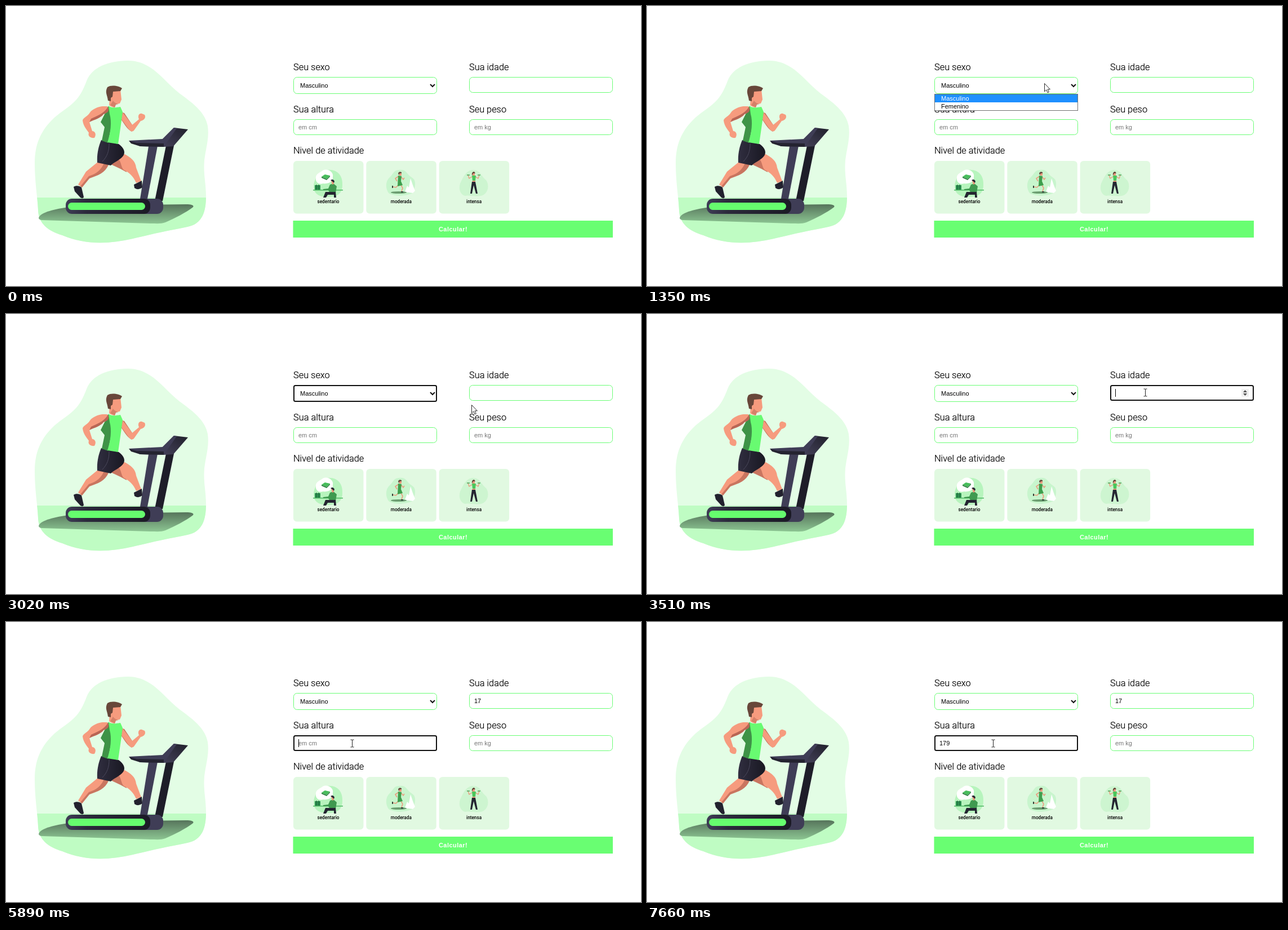
Animation, 1127 px wide and 497 px high, one loop 7.99 s. Source, as an HTML page:

```html
<!DOCTYPE html>
<html lang="pt-BR">
<head>
<meta charset="utf-8">
<title>Calculadora</title>
<style>
html, body { margin: 0; width: 100%; height: 100%; overflow: hidden; background: #fff; }
svg { display: block; width: 1127px; height: 497px; }
.label { font: 300 16.35px Roboto, sans-serif; stroke: #000; stroke-width: .2; }
.field { font: 11px "Liberation Sans", Arial, sans-serif; }
.hint { fill: #757575; }
.level { font: 500 8.2px Roboto, sans-serif; text-anchor: middle; }
.send { font: bold 11px "Liberation Sans", Arial, sans-serif; letter-spacing: .45px; text-anchor: middle; fill: #fff; }
.box { fill: #fff; stroke: #69fd74; }
#ring { fill: #fff; stroke: #101010; stroke-width: 2; }
</style>
</head>
<body>
<svg viewBox="0 0 1127 497">
  <defs>
    <clipPath id="blob"><path d="M215 97C181 98 153 108 143 133C132 162 124 170 100 187C67 210 51 240 51 277C51 315 56 338 57 363C58 386 74 399 100 407C140 424 182 423 225 413C270 402 298 397 322 392C349 387 355 364 355 338C355 313 350 300 352 274C355 250 361 235 358 213C354 191 336 176 316 161C281 138 262 96 215 97Z"/></clipPath>
    <linearGradient id="shade" x1="0" y1="0" x2="0" y2="1"><stop stop-color="#56745b"/><stop offset="1" stop-color="#8cc592"/></linearGradient>
    <linearGradient id="deck"><stop stop-color="#3f3d56"/><stop offset=".25" stop-color="#2b293b"/><stop offset="1" stop-color="#1b1a25"/></linearGradient>
    <linearGradient id="panel" x1="0" y1="1" x2="1" y2="0"><stop stop-color="#444159"/><stop offset="1" stop-color="#20202b"/></linearGradient>
    <linearGradient id="cloth"><stop stop-color="#302e40"/><stop offset="1" stop-color="#191822"/></linearGradient>
  </defs>

  <g clip-path="url(#blob)">
    <path fill="#e3fde5" d="M40 90H370V430H40Z"/>
    <path fill="#bffcc3" d="M40 340H370V430H40Z"/>
  </g>
  <path fill="url(#shade)" d="M58 376C61 366 88 360 112 357L220 353L320 352C330 352 334 354 332 357C319 367 299 377 283 384C276 387 267 386 258 386L63 380Q58 379 58 376Z"/>

  <!-- treadmill -->
  <path fill="#1e1d29" d="M284 248H298L278 346H264Z"/>
  <rect x="200" y="342" width="79" height="27" rx="11" fill="#3f3d56"/>
  <rect x="106" y="342" width="150" height="27" rx="11" fill="url(#deck)"/>
  <rect x="110" y="349" width="137" height="13" rx="6.5" fill="#66fd6e"/>
  <path fill="#3f3d56" d="M254 243H270L251 342H238Z"/>
  <path fill="url(#panel)" d="M298 216L323 219L297 249L280 250L276 238Z"/>
  <path fill="#3f3d56" d="M218 239L278 236L298 216L303 217L280 250L238 249Z"/>
  <path fill="#242330" d="M218 239L232 243L280 244V250L238 249L222 244Z"/>

  <!-- runner -->
  <path fill="#c97560" d="M204 188L210 190L224 211L229 213L223 223C214 218 208 206 204 201Z"/>
  <path fill="#f69b7e" d="M207 189L224 211L236 201C233 194 237 190 241 191L246 193C249 198 245 203 239 204L227 221Q223 225 218 219L205 201Z"/>
  <path fill="#c97560" d="M198 268L210 273L214 295L203 289L186 281Z"/>
  <path fill="#f69b7e" d="M208 262C222 268 230 276 231 287L240 311L231 314C226 303 221 297 209 291C204 286 205 278 200 272Z"/>
  <path fill="#f69b7e" d="M164 276L181 282C175 296 160 301 148 306L135 322L128 317L142 294Z"/>
  <path fill="#c97560" d="M174 279L182 282C176 296 163 301 148 306L135 322L132 320L147 302C160 298 169 291 174 279Z"/>
  <path fill="#22212e" d="M120 321C124 318 131 319 134 322L138 339Q137 343 132 340L122 329Z"/>
  <path fill="#22212e" d="M227 317L241 310L242 322Q235 328 228 323Z"/>
  <path fill="url(#cloth)" d="M169 238L200 245C210 252 212 260 208 266C202 274 193 276 186 283L162 278C161 263 164 250 169 238Z"/>
  <path fill="none" stroke="#4b495c" d="M183 244C183 257 180 267 171 276"/>
  <path fill="#3e9347" d="M181 178L188 184L187 214L181 243L170 239L175 215L168 206L175 192Z"/>
  <path fill="#68fb71" d="M182 177C186 182 196 180 203 179L207 188L204 210L199 245L180 242C186 225 188 205 184 192Z"/>
  <path fill="#f69b7e" d="M171 178C163 179 153 183 149 189C145 196 137 198 136 203C137 213 143 219 147 225C145 230 149 235 157 234C161 228 158 222 153 222L148 206C156 202 168 199 173 192C182 189 184 181 179 178Z"/>
  <path fill="#b96655" d="M181 179C184 188 180 189 173 192C168 199 156 202 148 206L151 200C161 195 173 192 181 179Z"/>
  <path fill="#f69b7e" d="M185 150L203 148L205 166L202 173L195 174L193 180Q188 180 183 176Z"/>
  <path fill="#d58169" d="M190 168Q193 173 200 174L195 175L193 180L185 176Z"/>
  <path fill="#68473a" d="M181 168C180 158 175 153 180 144C187 139 201 142 206 146L203 151L190 152L189 161L186 163V169Z"/>

  <g id="form"></g>

  <!-- sedentary -->
  <path fill="#b7f4bd" d="M570 291C588 289 598 301 597 318C597 334 586 339 573 339C558 340 546 334 546 321C546 307 556 293 570 291Z"/>
  <path fill="#fff" d="M550 306C549 298 557 296 562 292C571 287 582 295 580 303C581 313 570 316 563 315C555 318 549 312 550 306Z"/>
  <path fill="#48bd5c" d="M560 303L566 299L575 301L569 307Z"/>
  <path fill="#2e7d42" d="M560 303L569 307L575 301V303L569 309L560 305Z"/>
  <path fill="#4fb864" d="M545 326H598V327.5H545Z"/>
  <path fill="#2d9450" d="M548 318H558V326H548Z"/>
  <path stroke="#1c5836" d="M551 317V326M555 317V326"/>
  <path fill="#3f9a50" d="M575 317L581 315L587 320L585 332H575L572 327L563 327V325L572 324Z"/>
  <path fill="#e99679" d="M577 310H582V316L579 317Z"/>
  <path fill="#242531" d="M576 309Q581 306 583 311L582 314L580 312ZM585 330H567L563 340H568L571 335H582V340H586Z"/>

  <!-- moderate -->
  <path fill="#c8f5cd" d="M697 291C711 289 710 298 721 305C730 311 725 325 722 332C709 338 692 338 680 333C673 325 673 311 681 304C688 298 687 292 697 291Z"/>
  <path fill="#fff" d="M708 330L712 319L715 322L718 306L722 318L726 328L722 332Z"/>
  <ellipse cx="697" cy="331" rx="14" ry="2" fill="#6b9d70"/>
  <path fill="none" stroke="#e99b7e" stroke-width="1.6" d="M697 302L691 306L694 311M701 303L705 308L707 305M696 318L692 322L687 321M701 318L704 323L702 329"/>
  <path fill="#3e9f4d" d="M696 301L702 302L701 311L704 318L695 320Z"/>
  <path fill="#e99b7e" d="M697 296H702V301H698Z"/>
  <path fill="#684b3e" d="M696 297Q697 293 702 295V297H699L697 300Z"/>
  <path stroke="#31433a" stroke-width="2" d="M686 319V323M701 330H705"/>

  <!-- intense -->
  <path fill="#cdf5d0" d="M827 291C842 290 843 302 852 309C859 319 855 332 846 336C836 340 825 335 815 337C806 335 803 325 806 315C810 307 815 293 827 291Z"/>
  <path fill="none" stroke="#e99b7e" stroke-width="1.4" d="M827 303L822 306L820 300M833 303L838 306L840 300"/>
  <path fill="#4ac65b" d="M827 301H834L833 310H828Z"/>
  <path fill="#e99b7e" d="M828 296H832V301H828ZM828 310H833V313H827Z"/>
  <path fill="#654538" d="M827 301Q826 294 831 294L833 297H829Z"/>
  <path fill="#242531" d="M827 312H833L837 333H834L830 318L827 333H824Z"/>
  <path stroke="#4fa45b" stroke-width="1.6" d="M818 300H823M837 300H842"/>

  <g id="menu">
    <rect x="510.5" y="156.5" width="254" height="29" fill="#fff" stroke="#707070"/>
    <rect id="pick" x="511" width="253" height="14" fill="#1e90ff"/>
    <text id="opt0" class="field" x="522" y="167.5">Masculino</text>
    <text id="opt1" class="field" x="522" y="181.5">Femenino</text>
  </g>
  <g id="spin">
    <rect x="1055" y="133" width="13" height="14" fill="#efefef"/>
    <path fill="#505050" d="M1058 139L1061.5 135L1065 139ZM1058 141L1061.5 145L1065 141Z"/>
  </g>
  <g id="recall">
    <rect x="509.5" y="230.5" width="256" height="46" rx="2" fill="#fff" stroke="#d4d4d4"/>
    <text class="field" x="519" y="257.5">179</text>
  </g>
  <rect id="caret" width="1" height="14"/>
  <path id="arrow" fill="#fff" stroke="#111" stroke-width=".9" d="M.5 .5V14.8L3.8 11.8L6 16.8L8.3 15.8L6.1 10.9H10.4Z"/>
  <path id="beam" fill="none" stroke="#222" d="M-3 -6.5H-1Q0 -6.5 0 -5.5Q0 -6.5 1 -6.5H3M0 -6V6M-3 6.5H-1Q0 6.5 0 5.5Q0 6.5 1 6.5H3"/>
</svg>
<script>
const LOOP = 7990;
const $ = id => document.getElementById(id);
const put = (id, attrs) => {
  for (const k in attrs) $(id).setAttribute(k, attrs[k]);
};
const text = (cls, x, y, s, id = '') => `<text id="${id}" class="${cls}" x="${x}" y="${y}">${s}</text>`;

// left, top, height
const fields = { sex: [510, 126, 30], age: [822, 126, 28], height: [510, 201, 28], weight: [822, 201, 28] };
const box = ([x, y, h]) => `<rect class="box" x="${x + .5}" y="${y + .5}" width="254" height="${h - 1}" rx="6"/>`;

$('form').innerHTML =
  text('label', 510, 113.5, 'Seu sexo') + text('label', 822, 113.5, 'Sua idade') +
  text('label', 510, 188.5, 'Sua altura') + text('label', 822, 188.5, 'Seu peso') +
  text('label', 510, 262, 'Nivel de atividade') +
  Object.values(fields).map(box).join('') + '<rect id="ring" width="253" rx="2.5"/>' +
  text('field', 522, 145, 'Masculino') + text('field', 831, 144, '', 'ageText') +
  text('field', 519, 219, '', 'heightText') + text('field hint', 831, 219, 'em kg') +
  '<path fill="none" stroke="#111" stroke-width="2" d="M753 139L757 143L761 139"/>' +
  ['sedentario', 'moderada', 'intensa'].map((s, i) =>
    `<rect x="${510 + i * 129.3}" y="275" width="124.5" height="93.5" rx="6" fill="#e1f9e1"/>` +
    text('level', 572 + i * 129.3, 349.5, s)).join('') +
  '<rect x="509.5" y="381" width="567.5" height="30" fill="#69fe72"/>' + text('send', 793.5, 400, 'Calcular!');

// pointer stops: time, x, y
const path = [
  [40, 1083, 485], [200, 930, 410], [380, 700, 310], [530, 560, 250], [630, 598, 206],
  [720, 693, 166], [820, 704, 160], [940, 706, 119], [1100, 705, 137], [1630, 705, 137],
  [1800, 700, 158], [2010, 690, 181], [2150, 690, 181], [2350, 690, 163], [2890, 690, 163],
  [3020, 826, 161], [3200, 870, 144], [3400, 884, 139], [5150, 884, 139],
  [5400, 800, 168], [5650, 660, 207], [5830, 614, 215], [LOOP, 614, 215]
];

function pointer(t) {
  const i = Math.max(1, path.findIndex(p => p[0] > t));
  const [a, x, y] = path[i - 1], [b, u, v] = path[i], k = (t - a) / (b - a);
  return [x + (u - x) * k, y + (v - y) * k];
}

const show = (id, on) => $(id).style.display = on ? '' : 'none';
const typed = (t, keys) => keys.filter(k => t >= k[0]).map(k => k[1]).join('');
const over = (x, y, [l, top, h]) => x > l && x < l + 255 && y > top && y < top + h;
const during = (t, a, b) => t >= a && t < b;

function draw(t) {
  const [x, y] = pointer(t);
  const onAge = over(x, y, fields.age);
  const beam = onAge || over(x, y, fields.height) || over(x, y, fields.weight);
  const snap = v => Math.round(v) + (beam ? .5 : 0);
  show('arrow', t >= 40 && !beam);
  show('beam', t >= 40 && beam);
  put(beam ? 'beam' : 'arrow', { transform: `translate(${snap(x)} ${snap(y)})` });

  show('menu', during(t, 1200, 2630));
  const low = y >= 171;
  put('pick', { y: low ? 171 : 157 });
  put('opt0', { fill: low ? '#000' : '#fff' });
  put('opt1', { fill: low ? '#fff' : '#000' });

  const focus = t < 2630 ? null : t < 3470 ? 'sex' : t < 5860 ? 'age' : 'height';
  show('ring', focus);
  if (focus) {
    const [left, top, h] = fields[focus];
    put('ring', { x: left + 1, y: top + 1, height: h - 2 });
  }
  show('spin', focus === 'age' || onAge);
  show('recall', during(t, 5920, 7130));

  const age = typed(t, [[4530, '1'], [5090, '7']]);
  const height = typed(t, [[6710, '1'], [7000, '7'], [7130, '9']]);
  $('ageText').textContent = age;
  $('heightText').textContent = height || 'em cm';
  $('heightText').classList.toggle('hint', !height);

  const blink = during(t, 3970, 4480) || during(t, 5590, 5890) || during(t, 6380, 6710) || t >= 7660;
  show('caret', t >= 3470 && !blink);
  const [left, top, value] = focus === 'height' ? [519, 208, height] : [831, 133, age];
  put('caret', { x: left + Math.floor(value.length * 6.1), y: top });
}

function tick() {
  draw(performance.now() % LOOP);
  requestAnimationFrame(tick);
}
tick();
</script>
</body>
</html>
```
